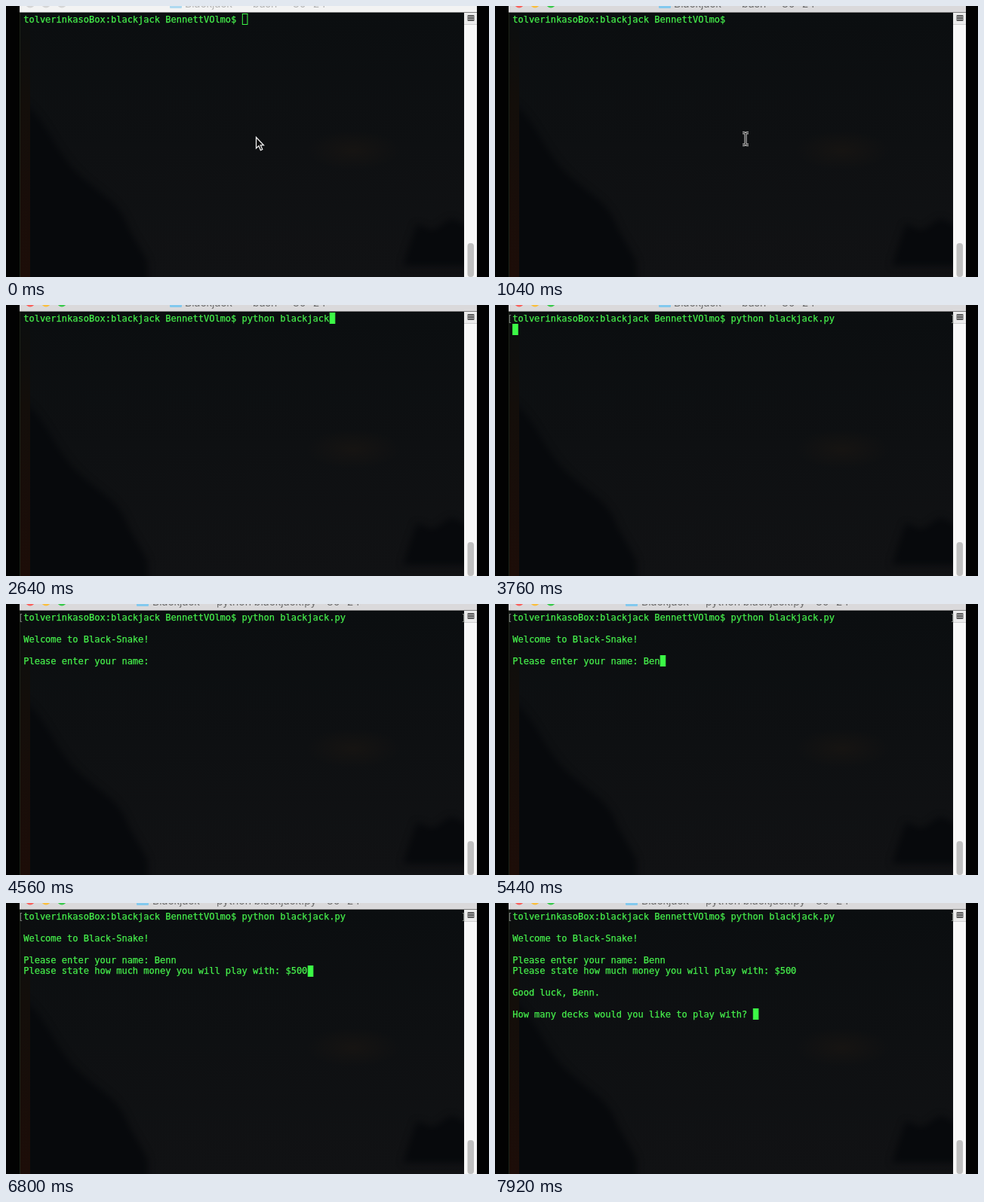
These frames come from a looping animation (640x360 px, 8 s). An HTML page:

```html
<!DOCTYPE html>
<html lang="en">
<head>
<meta charset="utf-8">
<title>Blackjack terminal</title>
<style>
  html, body { margin: 0; width: 100%; height: 100%; overflow: hidden; background: #020202; }
  svg { display: block; width: 640px; height: 360px; }
  text { white-space: pre; }
  #screen { font: 12.03px "DejaVu Sans Mono", monospace; fill: #46f04c; stroke: #46f04c; stroke-width: .25; }
  .title { font: 14px Inter, sans-serif; fill: #6c6c6c; }
  .inactive .title { fill: #b4b4b4; }
  #bar { fill: #dad9db; }
  .inactive #bar { fill: #f3f3f3; }
  .inactive #lights circle { fill: #d6d6d6; }
  .inactive #folder { opacity: .6; }
  #block { fill: #3cf946; stroke: #3cf946; }
  .inactive #block { fill: none; }
  #screen .bracket { fill: #858b86; stroke: none; }
</style>
</head>
<body>
<svg id="stage" viewBox="0 0 640 360">
  <defs>
    <linearGradient id="sky" x2="0" y2="1">
      <stop offset="0" stop-color="#0b0e10"/>
      <stop offset=".5" stop-color="#0e1012"/>
      <stop offset="1" stop-color="#111214"/>
    </linearGradient>
    <linearGradient id="edge" x2="0" y2="1">
      <stop offset="0" stop-color="#0b0e0f"/>
      <stop offset=".35" stop-color="#130e0a"/>
      <stop offset="1" stop-color="#1d0d08"/>
    </linearGradient>
    <radialGradient id="glow">
      <stop offset="0" stop-color="#161412"/>
      <stop offset="1" stop-color="#161412" stop-opacity="0"/>
    </radialGradient>
    <filter id="soft" x="-20%" y="-20%" width="140%" height="140%" color-interpolation-filters="sRGB">
      <feGaussianBlur stdDeviation="5"/>
    </filter>
    <clipPath id="pane"><rect x="18" y="9" width="590" height="351"/></clipPath>
  </defs>

  <g clip-path="url(#pane)">
    <rect x="18" y="9" width="590" height="351" fill="url(#sky)"/>
    <ellipse cx="460" cy="192" rx="62" ry="26" fill="url(#glow)"/>
    <g filter="url(#soft)" fill="#07090c">
      <path d="M20 126C55 150 62 190 95 222S150 258 163 296L188 340V380H20Z"/>
      <path d="M526 345L544 290L566 298L590 282L620 296V345Z"/>
    </g>
    <rect x="18" y="9" width="14" height="351" fill="url(#edge)"/>
    <path d="M18.5 9V360" stroke="#1d2419"/>
  </g>

  <rect id="bar" x="18" width="606" height="8"/>
  <rect x="18" y="8" width="606" height="1" fill="#7c7c7c"/>
  <g id="lights">
    <circle cx="32" cy="-4" r="6.5" fill="#f9605b"/>
    <circle cx="53" cy="-4" r="6.5" fill="#fabe3c"/>
    <circle cx="74" cy="-4" r="6.5" fill="#3ac94c"/>
  </g>
  <rect id="folder" y="-9" width="16" height="12" rx="1" fill="#83c9ee"/>
  <g id="titles"></g>

  <rect x="607" y="9" width="17" height="351" fill="#f8f8f8"/>
  <rect x="607" y="9" width="17" height="15" fill="#ececec"/>
  <path d="M607 24.5H624" stroke="#d0d0d0"/>
  <rect x="611.5" y="12" width="9" height="8" rx="1" fill="#5c5c5c"/>
  <path d="M612 14.5H620M612 17.5H620" stroke="#c8c8c8" stroke-width=".8"/>
  <rect x="611.5" y="315" width="8.5" height="45" rx="4" fill="#bfbfbf"/>

  <g id="screen"></g>
  <rect id="block" width="6.6" height="14"/>

  <path id="arrow" d="M331.5 174.5V189L334.9 185.8L337.4 191.6L339.8 190.5L337.3 184.9H341.4Z"
        fill="#0a0a0a" stroke="#f2f2f2" stroke-width="1.3"/>
  <g id="beam" fill="none">
    <path d="M328 168.5H330.5L332 170L333.5 168.5H336M332 170V183M328 184.5H330.5L332 183L333.5 184.5H336"
          stroke="#a8a8a8" stroke-width="3.4"/>
    <path d="M328 168.5H330.5L332 170L333.5 168.5H336M332 170V183M328 184.5H330.5L332 183L333.5 184.5H336"
          stroke="#232323" stroke-width="1"/>
  </g>
</svg>
<script>
const LOOP = 8000, FOCUS = 480, TYPING = 1600, RUN = 3760, LAUNCHED = 3920;
const LEFT = 23.2, TOP = 10.4, COLUMN = 7.243, ROW = 14.45;
const el = id => document.getElementById(id);

// Every entry appends text to the terminal at its time.
const output = [];
const print = (time, text) => output.push({ time, text });
const type = (time, text, step) => [...text].forEach((c, i) => print(time + i * step, c));

print(0, "tolverinkasoBox:blackjack BennettVOlmo$ ");
type(TYPING, "python blackjack", 60);
type(2960, ".p", 80);
print(3280, "y");
print(RUN, "\n");
print(LAUNCHED, "\nWelcome to Black-Snake!\n\nPlease enter your name: ");
type(5040, "Benn", 160);
print(5760, "\nPlease state how much money you will play with: $");
type(6240, "500", 240);
print(7440, "\n\nGood luck, Benn.\n\nHow many decks would you like to play with? ");

function addText(parent, x, y, content, className) {
  const node = document.createElementNS("http://www.w3.org/2000/svg", "text");
  node.setAttribute("x", x);
  node.setAttribute("y", y);
  if (className) node.setAttribute("class", className);
  node.textContent = content;
  parent.append(node);
}

const show = (id, visible) => el(id).setAttribute("visibility", visible ? "visible" : "hidden");

function drawTitle(running) {
  const parts = running
    ? [[194, "Blackjack"], [261, "—"], [279, "python blackjack.py"], [408, "—"], [425, "80×24"]]
    : [[237, "Blackjack"], [307, "—"], [327, "bash"], [362, "—"], [380, "80×24"]];
  el("titles").replaceChildren();
  parts.forEach(([x, word]) => addText(el("titles"), x, 1.5, word, "title"));
  el("folder").setAttribute("x", running ? 173 : 217);
}

function drawScreen(printed, bracketed) {
  const lines = printed.map(p => p.text).join("").split("\n");
  const screen = el("screen");
  screen.replaceChildren();
  lines.forEach((line, row) => addText(screen, LEFT, 22 + row * ROW, line));
  if (bracketed) {
    addText(screen, LEFT - COLUMN, 22, "[", "bracket");
    addText(screen, LEFT + 80 * COLUMN, 22, "]", "bracket");
  }
  const row = lines.length - 1;
  el("block").setAttribute("x", LEFT + lines[row].length * COLUMN + .4);
  el("block").setAttribute("y", Math.round(TOP + row * ROW) + .5);
}

let lastState = "";
function frame() {
  const t = performance.now() % LOOP;
  const printed = output.filter(p => p.time <= t);
  const focused = t >= FOCUS, running = t >= LAUNCHED;

  const state = [printed.length, running].join();
  if (state !== lastState) {
    drawTitle(running);
    drawScreen(printed, t >= RUN);
    lastState = state;
  }

  el("stage").classList.toggle("inactive", !focused);
  const blinkStart = Math.max(FOCUS, printed.at(-1).time);
  show("block", !focused || (t - blinkStart) % 1000 < 500);
  show("arrow", !focused);
  show("beam", focused && t < TYPING);
  requestAnimationFrame(frame);
}
frame();
</script>
</body>
</html>
```
